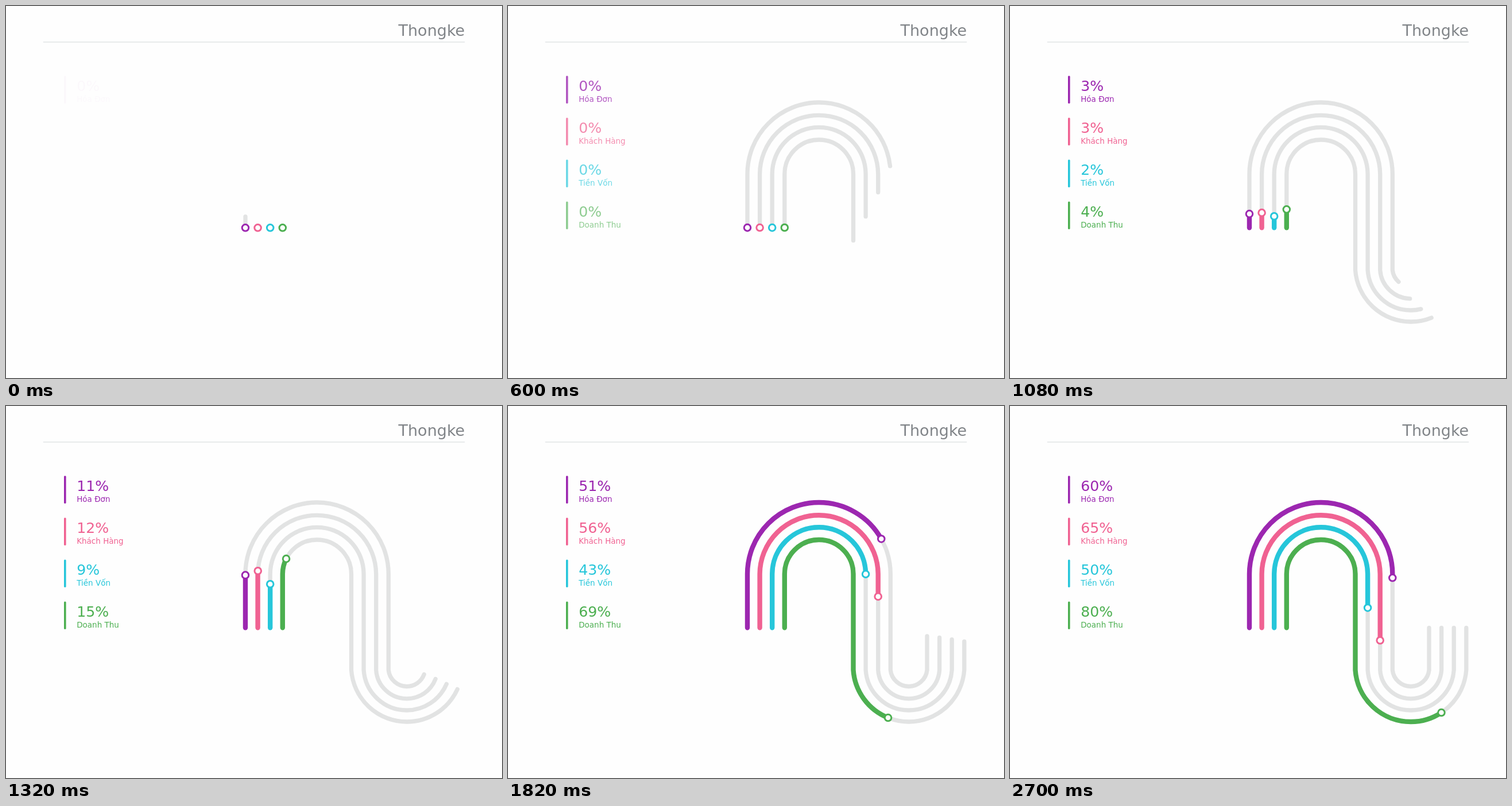
Recreate the animation shown at these times as an HTML page. Size 864 by 648 pixels, loop 6820 ms.

```html
<!DOCTYPE html>
<html lang="vi">
<head>
<meta charset="utf-8">
<title>Thongke</title>
<style>
  html, body { margin: 0; width: 100%; height: 100%; overflow: hidden; background: #fefefe; }
  svg { display: block; width: 864px; height: 648px; }
  text { font-family: "DejaVu Sans", sans-serif; }
  path { fill: none; stroke-linecap: round; }
  .track { stroke: #e2e3e3; stroke-width: 7.3; }
  .bar { stroke-width: 8.4; }
  .dot { fill: #fefefe; stroke-width: 3; }
  .title { font-size: 27px; fill: #808488; text-anchor: end; }
  .value { font-size: 25.2px; }
  .label { font-size: 13.5px; }
</style>
</head>
<body>
<svg id="stage" viewBox="0 0 864 648"></svg>
<script>
const LOOP = 6820, STEP = 20;
const START_Y = 386.3, ARCH_Y = 292.5, BOWL_Y = 460;

// top and bottom are the extreme heights of the arch and the bowl
const series = [
  { name: 'Hóa Đơn', color: '#9c27b0', value: 60, top: 168, bottom: 488.5 },
  { name: 'Khách Hàng', color: '#f06292', value: 65, top: 190.3, bottom: 509.8 },
  { name: 'Tiền Vốn', color: '#26c6da', value: 50, top: 211.3, bottom: 530 },
  { name: 'Doanh Thu', color: '#4caf50', value: 80, top: 233, bottom: 550 }
];

const clamp = v => Math.min(1, Math.max(0, v));
const phase = (t, start, duration) => clamp((t - start) / duration);
const outCubic = u => 1 - (1 - u) ** 3;
const inOutQuint = u => u < 0.5 ? 16 * u ** 5 : 1 - 16 * (1 - u) ** 5;

// Circular arc to (x, y) from its chord half-width and its height
function arc(half, rise, sweep, x, y) {
  const r = (half * half + rise * rise) / (2 * rise);
  return `A${r} ${r} 0 ${rise > half ? 1 : 0} ${sweep} ${x} ${y}`;
}

function track({ top, bottom }, i) {
  const x1 = 417 + 21.6 * i, x2 = 666.3 - 21.6 * i, x3 = 730 + 21.6 * i;
  return `M${x1} ${START_Y}V${ARCH_Y}` + arc((x2 - x1) / 2, ARCH_Y - top, 1, x2, ARCH_Y) +
    `V${BOWL_Y}` + arc((x3 - x2) / 2, bottom - BOWL_Y, 0, x3, BOWL_Y) + `V${START_Y}`;
}

const stage = document.getElementById('stage');
const paths = series.map(track);

stage.innerHTML =
  `<text class="title" x="799.2" y="52">Thongke</text>
   <path d="M64.8 62.8H799.2" stroke="#e1e5e6" stroke-width="1.5" style="stroke-linecap:butt"/>` +
  series.map((s, i) => `
    <g class="legend" fill="${s.color}" transform="translate(0 ${73 * i})">
      <rect x="101" y="121.5" width="3.6" height="48.6" rx="1.8"/>
      <text class="value" x="123.3" y="147.5"></text>
      <text class="label" x="123.2" y="167">${s.name}</text>
    </g>`).join('') +
  paths.map(d => `<path class="track" d="${d}"/>`).join('') +
  series.map((s, i) => `<path class="bar" d="${paths[i]}" stroke="${s.color}"/>`).join('') +
  series.map(s => `<circle class="dot" r="5.8" stroke="${s.color}"/>`).join('');

const all = name => [...stage.querySelectorAll('.' + name)];
const legends = all('legend'), values = all('value');
const tracks = all('track'), bars = all('bar'), dots = all('dot');
const lengths = tracks.map(p => p.getTotalLength());

function reveal(path, length) {
  path.style.visibility = length > 0 ? 'visible' : 'hidden';
  path.setAttribute('stroke-dasharray', `${length} 2000`);
}

function draw(t) {
  const fill = inOutQuint(phase(t, 294, 2500));
  series.forEach((s, i) => {
    const delay = 40 * i - 20;
    const length = lengths[i] * s.value / 100 * fill;
    const tip = bars[i].getPointAtLength(length);
    legends[i].setAttribute('opacity', phase(t, delay, 800));
    values[i].textContent = Math.round(s.value * fill) + '%';
    reveal(tracks[i], lengths[i] * outCubic(phase(t, delay, 2500)));
    reveal(bars[i], length);
    dots[i].setAttribute('cx', tip.x);
    dots[i].setAttribute('cy', tip.y);
  });
}

const origin = performance.now();
function tick() {
  const t = (performance.now() - origin) % LOOP;
  draw(Math.floor(t / STEP) * STEP);
  requestAnimationFrame(tick);
}
tick();
</script>
</body>
</html>
```
